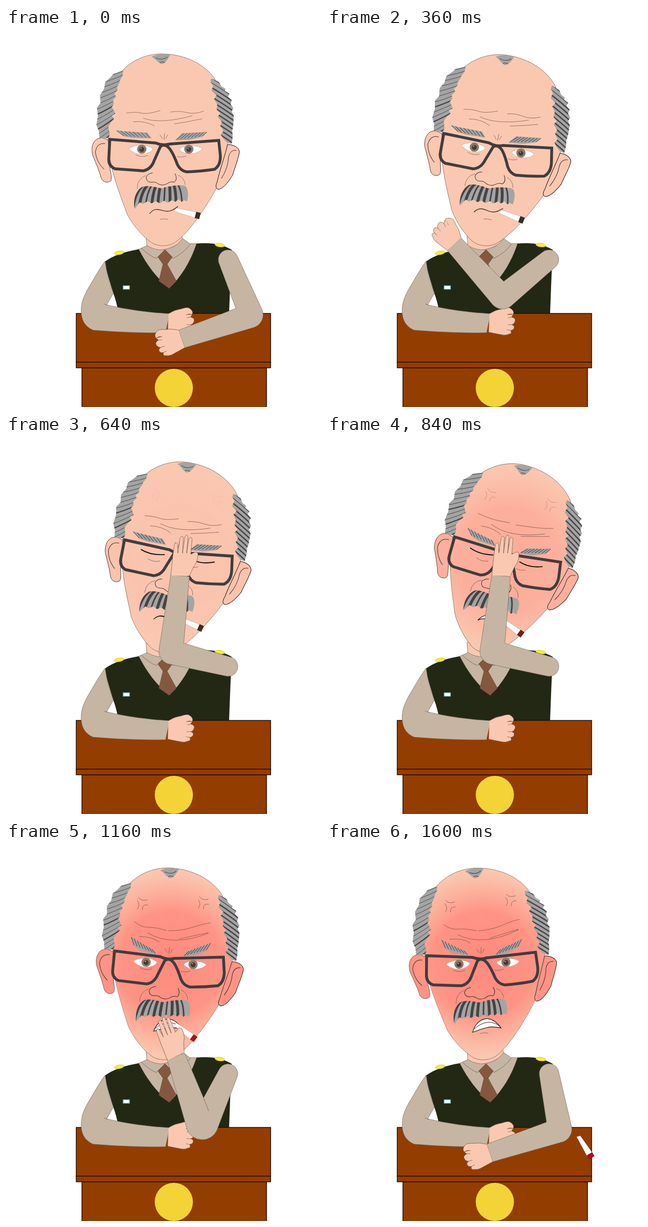
Animation of 610x735 px, one loop 2 s. Source, as an HTML page:

```html
<!DOCTYPE html>
<html lang="en">
<head>
<meta charset="utf-8">
<title>Grumpy man at a desk</title>
<style>
html, body { margin: 0; width: 100%; height: 100%; overflow: hidden; background: #fff; }
svg { display: block; width: 610px; height: 735px; }
.skin { fill: #fac8b1; stroke: #54443c; stroke-width: .6; }
.cloth { fill: #c6b5a3; stroke: #65594d; stroke-width: .6; }
.line { fill: none; stroke: #5d4038; stroke-width: .6; }
.bold { fill: none; stroke: #3f2d27; stroke-width: 1; }
.hair { fill: #a5a4a4; }
.strand { fill: none; stroke: #464344; }
.wood { fill: #943d00; stroke: #1d0c00; stroke-width: 1.4; }
</style>
</head>
<body>
<svg viewBox="0 0 610 735">
  <defs>
    <radialGradient id="flush" gradientUnits="userSpaceOnUse" cx="310" cy="235" r="182">
      <stop offset="0" stop-color="#ff8a7d"/>
      <stop offset=".55" stop-color="#ff8f81" stop-opacity=".92"/>
      <stop offset="1" stop-color="#ff9c89" stop-opacity="0"/>
    </radialGradient>
    <path id="skull" d="M222 86C205 120 197 170 197 215C200 270 214 305 235 362C250 390 272 410 283 417C295 424 315 425 330 414C355 395 385 352 408 310C425 270 432 225 430 200C428 160 415 120 404 98C386 72 350 51 302 50C275 50 245 60 222 86Z"/>
    <path id="earL" d="M198 218C190 212 180 212 174 217C166 224 165 236 168 247C174 262 181 278 184 290C187 300 198 301 203 296C206 290 202 280 200 262Z"/>
    <path id="earR" d="M429 226C440 226 451 231 452 240C450 255 443 270 439 285C430 300 420 312 411 313C405 311 406 305 409 298C414 275 425 245 429 226Z"/>
    <path id="hairL" d="M208 89L222 84L227 83L226 92L221 101L219 108L215 114L216 120L210 128L213 133L207 140L209 147L205 153L212 166L205 170L209 176L203 183L198 192L201 205L199 213L181 214L180 200L175 188L178 170L176 155L183 145L182 130L190 118L192 105L203 95Z"/>
    <path id="hairR" d="M397 98L412 104L417 113L425 118L424 122L433 127L430 133L437 140L435 148L440 155L437 162L441 170L440 190L438 200L439 210L437 225L428 222L421 215L416 207L421 200L415 190L418 182L410 172L415 165L408 158L409 148L403 138L408 130L398 122L401 112L396 104Z"/>
    <path id="tache" d="M249 351C246 335 250 318 262 309C275 304 290 309 300 311C315 307 335 303 347 306C354 313 353 325 351 336L345 334L340 337L334 332L328 337L321 334L313 339L306 335L298 340L290 336L282 340L274 336L266 341L259 338Z"/>
    <path id="fist" class="skin" d="M0 18Q12 26 24 28Q36 33 40 30Q49 25 46 18L43 13Q52 11 50 5Q49 0 44-2Q51-4 48-10Q45-13 42-13Q46-19 40-20Q32-24 24-22Q12-20 0-18M46 18Q40 20 34 17M43 13L36 11M44-2L36-2M42-13L35-12"/>
    <clipPath id="clipL"><use href="#hairL"/></clipPath>
    <clipPath id="clipR"><use href="#hairR"/></clipPath>
    <clipPath id="clipT"><use href="#tache"/></clipPath>
  </defs>

  <path class="skin" d="M271 402L273 426Q300 440 342 414L340 396Z"/>
  <path class="cloth" d="M257 429L273 422Q290 432 308 430Q328 427 342 408L356 418L370 418Q352 470 316 506Q280 475 257 429Z"/>
  <path fill="#232814" d="M193 452Q215 436 257 429Q280 475 316 505Q352 470 369 418Q410 414 437 430L434 500L432 554H218Q214 530 207 512L190 455Z"/>
  <path class="line" d="M262 427Q278 442 291 447L308 430L323 447Q345 436 357 419"/>
  <path fill="#84583f" stroke="#5d3d2c" stroke-width=".6" d="M308 430L322 444L312 458L330 491L316 505L296 491L304 458L294 444ZM304 458H312"/>
  <g fill="#f6ec3f" stroke="#d8c92c" stroke-width=".8">
    <ellipse cx="219" cy="436" rx="9.500" ry="3.600" transform="rotate(-10 219 436)"/>
    <ellipse cx="414" cy="421" rx="9.500" ry="3.600" transform="rotate(8 414 421)"/>
  </g>
  <rect x="227" y="500" width="12" height="6.500" fill="#fff" stroke="#7fc8c8" stroke-width="1.400"/>

  <rect class="wood" x="147" y="659" width="357.500" height="80"/>
  <rect class="wood" x="136" y="553.500" width="376.500" height="95"/>
  <rect class="wood" x="136" y="648" width="376.500" height="11"/>
  <circle cx="325" cy="698" r="37" fill="#f3d335"/>

  <path class="cloth" d="M192 452Q180 468 165 495Q147 523 146 540C143 568 155 580 169 586Q240 592 309 591L317 554Q255 551 195 537L208 514Q196 485 192 452Z"/>
  <path class="line" d="M190 535L197 538"/>
  <use href="#fist" transform="translate(314 572) rotate(2) scale(1 -1)"/>

  <g id="head">
    <use href="#skull" class="skin"/>
    <use href="#earL" class="skin"/>
    <use href="#earR" class="skin"/>
    <g id="red">
      <use href="#skull" fill="url(#flush)"/>
      <g fill="#ff9486"><use href="#earL"/><use href="#earR"/></g>
    </g>
    <use href="#earL" class="line"/>
    <use href="#earR" class="bold"/>
    <path class="bold" d="M192 224Q176 222 173 240Q175 260 190 274M446 237Q434 236 431 250Q430 272 417 292"/>
    <use href="#hairL" class="hair"/><g id="strandsL" class="strand" clip-path="url(#clipL)"></g>
    <use href="#hairR" class="hair"/><g id="strandsR" class="strand" clip-path="url(#clipR)"></g>
    <path class="hair" d="M282 56C290 50 310 49 318 52C312 64 306 70 301 70C293 66 290 60 282 56Z"/>
    <path class="strand" d="M290 58Q302 64 313 56M298 67Q303 64 308 67"/>
    <path id="wrinkles" class="line"/>
    <path class="line" d="M298 207L303 215M306 217L307 204M309 215L313 207"/>
    <g id="veins" class="line">
      <path id="vein" d="M242 110Q248 118 260 114M261 124Q250 122 251 134M240 116Q247 124 241 133"/>
      <use href="#vein" transform="translate(118 -7)"/>
    </g>
    <path id="browL" class="hair"/><path id="browR" class="hair"/>
    <path id="browLines" class="strand" stroke-width="1"/>
    <g id="open">
      <path fill="#fff" stroke="#b08c7c" stroke-width=".5" d="M238 234C250 225 275 225 284 234C283 240 270 245 262 245C250 244 242 239 238 234ZM336 235C345 226 368 226 380 234C375 241 365 244 355 244C345 243 338 240 336 235Z"/>
      <g fill="#8d7b6b"><circle cx="263" cy="235" r="9"/><circle cx="354" cy="235" r="9"/></g>
      <g fill="#443a36"><circle cx="263" cy="235.500" r="4.800"/><circle cx="354" cy="235.500" r="4.800"/></g>
      <g fill="#aaa097"><circle cx="261.500" cy="233.500" r="1.300"/><circle cx="352.500" cy="233.500" r="1.300"/></g>
    </g>
    <path id="shut" fill="none" stroke="#17100e" stroke-width="1.900" d="M235 230Q255 239 282 233.500M334 235Q355 243 380 234"/>
    <path class="line" d="M251 246Q263 252 275 247M331 249Q340 252 349 248"/>
    <path fill="none" stroke="#423c3e" stroke-width="5.500" d="M201 216L290 223Q304 229 317 225L412 218L415 247Q416 266 404 274Q378 278 350 279Q338 277 332 265Q322 238 314 231Q306 224 299 230L287 257Q281 274 266 277L211 273Q199 268 199 255Z"/>
    <path class="bold" d="M284 281C275 282 270 288 272 293Q274 300 283 299Q290 298 294 302Q303 307 312 302Q318 297 326 299Q333 293 327 282"/>
    <path class="line" d="M271 286Q254 292 254 312M333 285Q346 291 347 304M298 371Q306 369 314 371"/>
    <use href="#tache" class="hair"/><g id="strandsT" class="strand" clip-path="url(#clipT)"></g>
    <path id="mouth" fill="#fff" stroke="#1f1714" stroke-width="1.200"/>
    <path id="teeth" fill="none" stroke="#1f1714" stroke-width=".9" d="M287 362Q314 340 336 358"/>
  </g>

  <g id="cig">
    <path fill="#fff" stroke="#a79d97" stroke-width=".5" d="M1-4L42-6V6L-1 3Z"/>
    <path id="ember" d="M40-6.200H49V6.200H40Z"/>
  </g>

  <path id="arm" class="cloth"/>
  <path id="crease" class="line"/>
  <g id="hand">
    <use id="closed" href="#fist"/>
    <path id="palm" class="skin" transform="rotate(-5)" d="M0-18L36-15L60-12Q66-9 62-6L44-5L74-1Q79 3 74 5L44 4L76 8Q82 12 76 14L44 12L72 16Q78 21 71 22L42 20Q44 24 46 28Q48 34 40 34Q26 33 18 26L0 18"/>
  </g>
</svg>
<script>
const $ = id => document.getElementById(id);
const clamp = v => Math.max(0, Math.min(1, v));
const smooth = k => k * k * (3 - 2 * k);
const lerp = (a, b, k) => a + (b - a) * k;
const set = (id, name, value) => $(id).setAttribute(name, value);
const show = (id, on) => set(id, 'display', on ? 'inline' : 'none');
const at = ([x, y], deg, len) => {
  const a = deg * Math.PI / 180;
  return [x + Math.cos(a) * len, y + Math.sin(a) * len];
};
const pt = p => p.map(v => v.toFixed(2)).join(' ');

// blends two paths that share their commands
function mix(a, b, k) {
  const to = b.match(/-?[\d.]+/g);
  let i = 0;
  return a.replace(/-?[\d.]+/g, v => lerp(+v, +to[i++], k).toFixed(2));
}

function track(keys, t, ease = k => k) {
  let i = 0;
  while (i < keys.length - 2 && t >= keys[i + 1][0]) i++;
  const [a, b] = [keys[i], keys[i + 1]];
  const k = ease(clamp((t - a[0]) / (b[0] - a[0])));
  return a.slice(1).map((v, n) => lerp(v, b[n + 1], k));
}

function strands(id, count, draw) {
  let s = '';
  for (let i = 0; i < count; i++) {
    const [d, w] = draw(i);
    s += `<path d="${d}" stroke-width="${w}"/>`;
  }
  $(id).innerHTML = s;
}
strands('strandsL', 15, i => {
  const y = 90 + i * 9, rise = 9 + i * 1.3;
  return [`M168 ${y + rise}Q196 ${y + 7} 232 ${y - rise}`, i > 6 && i % 3 == 1 ? 2.2 : .9];
});
strands('strandsR', 14, i => {
  const y = 94 + i * 9;
  return [`M390 ${y - 10}Q415 ${y + 4} 446 ${y + 26}`, i < 3 ? 1.2 : 2.5];
});
strands('strandsT', 9, i => {
  const k = i - 4.4;
  return [`M${303 + k * 8.5} 305Q${300 + k * 11.5} 318 ${298 + k * 12} 354`, i % 3 == 2 ? 3 : 5.5];
});

const HEAD = [[0, 0], [450, 8], [620, 8], [860, 13], [1160, 2.7], [1600, -2.4]];
// time, upper arm angle and length, forearm angle and length
const ARM = [
  [0, 68.6, 115, 160.4, 140], [160, 86.5, 115, 189.2, 144],
  [360, 142.1, 114, 226.8, 137], [560, 195.5, 112, 275.9, 147],
  [1040, 195.5, 112, 275.9, 147], [1120, 162, 112, 265, 143],
  [1160, 117.3, 109, 248.6, 140], [1220, 105, 110, 200, 135],
  [1300, 38, 100, 42, 72], [1400, 62, 100, 85, 50], [1600, 80.5, 109.5, 160.9, 140.7]
];
const SHOULDER = [430, 449];
const NECK = [305.6, 411];

const BROW_L = ['M214 198L226 200L274 203L282 214L245 213L228 210Z', 'M232 186L241 194L276 210L283 219L252 214L238 204Z'];
const BROW_R = ['M389 201L379 202L341 204L327 218L355 217L380 211Z', 'M386 191L377 196L342 210L333 221L358 218L378 207Z'];
const WRINKLES = [
  'M233 165Q250 162 262 165T299 160M318 163Q335 160 350 164T383 161M266 175Q300 187 361 170M246 182Q268 179 288 190M326 186Q352 182 380 176',
  'M236 157Q250 168 264 167T300 172M303 172Q330 171 350 163T384 153M263 178Q312 204 381 173M247 186Q270 184 287 195M325 187Q350 180 381 172'
];
const MOUTH = [
  'M278 360C288 347 298 353 308 355C318 357 325 352 333 346C325 352 318 357 308 355C298 353 288 347 278 360Z',
  'M284 368C288 354 299 342 314 343C325 345 334 354 339 362C328 359 321 358 312 360C302 362 292 365 284 368Z'
];

// hatching between the upper and lower edge of a brow
function hatch(d) {
  const n = d.match(/-?[\d.]+/g).map(Number);
  let s = '';
  for (let i = 0; i < 8; i++) {
    const k = i / 7.5;
    s += `M${lerp(n[0], n[4], k)} ${lerp(n[1], n[5], k) + 1}L${lerp(n[10], n[6], k)} ${lerp(n[11], n[7], k) - 1}`;
  }
  return s;
}

function drawFace(t, tilt, rage) {
  set('head', 'transform', `rotate(${tilt} ${NECK.join(' ')})`);
  set('red', 'opacity', rage);
  set('veins', 'opacity', rage);
  const left = mix(...BROW_L, rage), right = mix(...BROW_R, rage);
  set('browL', 'd', left);
  set('browR', 'd', right);
  set('browLines', 'd', hatch(left) + hatch(right));
  set('wrinkles', 'd', mix(...WRINKLES, rage));
  set('mouth', 'd', mix(...MOUTH, rage));
  set('teeth', 'opacity', clamp(rage * 4 - 3));
  const asleep = t >= 500 && t < 1100;
  show('open', !asleep);
  show('shut', asleep);
}

function drawArm(t) {
  const [a1, l1, a2, l2] = track(ARM, t);
  const elbow = at(SHOULDER, a1, l1), wrist = at(elbow, a2, l2);
  const half = (a2 - a1) / 2;
  const fold = Math.max(0, half - 52);
  const bulge = 26 + fold * .4;
  const inner = at(elbow, a1 + half + 90, 20.5 / Math.max(.35, Math.cos(half * Math.PI / 180)));
  const side = (p, a, r) => pt(at(p, a + 90, r));
  set('arm', 'd', `M${side(SHOULDER, a1, 19)}L${pt(inner)}L${side(wrist, a2, 18)}L${side(wrist, a2, -18)}` +
    `L${side(elbow, a2, -bulge)}A${bulge} ${bulge} 0 0 0 ${side(elbow, a1, -bulge)}` +
    `L${side(SHOULDER, a1, -19)}A19 19 0 0 0 ${side(SHOULDER, a1, 19)}Z`);
  set('crease', 'd', `M${pt(inner)}L${pt(at(inner, a2, -fold * 2))}`);
  set('hand', 'transform', `translate(${pt(wrist)}) rotate(${a2})`);
  const flat = t >= 480 && t < 1220;
  show('closed', !flat);
  show('palm', flat);
  return at(wrist, a2, 30);
}

function drawCig(t, tilt, rage, hand) {
  const dx = 328 - 3 * rage - NECK[0], dy = 353 - NECK[1];
  const aim = Math.atan2(dy, dx) * 180 / Math.PI;
  let pos = at(NECK, aim + tilt, Math.hypot(dx, dy)), turn = 13.7 + 20 * rage + tilt;
  if (t > 1160) {
    const grab = clamp((t - 1160) / 60), drop = clamp((t - 1300) / 100);
    pos = pos.map((v, i) => lerp(lerp(v, hand[i], grab), [486.5, 571][i], drop));
    turn = lerp(36, 57.5, clamp((t - 1160) / 240));
  }
  set('cig', 'transform', `translate(${pt(pos)}) rotate(${turn})`);
  const c = [[59, 168], [44, 20], [34, 20]].map(([a, b]) => Math.round(lerp(a, b, rage)));
  set('ember', 'fill', `rgb(${c})`);
}

function draw(ms) {
  const t = Math.min(1600, Math.floor(ms % 2000 / 40) * 40);
  const [tilt] = track(HEAD, t, smooth);
  const rage = clamp((t - 600) / 520);
  drawFace(t, tilt, rage);
  drawCig(t, tilt, rage, drawArm(t));
}

let start;
function tick(now) {
  start ??= now;
  draw(now - start);
  requestAnimationFrame(tick);
}
draw(0);
requestAnimationFrame(tick);
</script>
</body>
</html>
```
